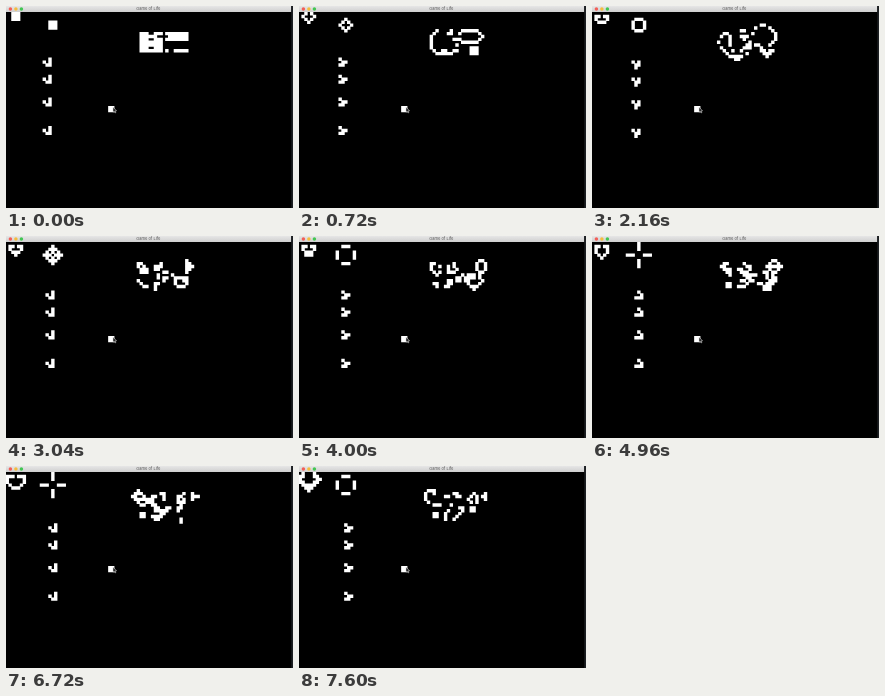
An HTML page with a canvas that plays this animation: 287x202 px, repeating every 8 s.

```html
<!DOCTYPE html>
<html lang="en">
<head>
<meta charset="utf-8">
<title>Game of Life</title>
<style>
  html, body { margin: 0; width: 100%; height: 100%; overflow: hidden; background: #000; }
  canvas { display: block; width: 287px; height: 202px; }
</style>
</head>
<body>
<canvas id="stage"></canvas>
<script>
const W = 287, H = 202, LOOP = 8000;
// Cells are drawn slightly larger than the grid pitch, so they overlap
const PITCH = 2.85, SIZE = 3.42, LEFT = -0.45, TOP = 6;
const COLS = 100, ROWS = 68;
const STEPS = [320, 1200, 2160, 3040, 4000, 4960, 5760, 6720, 7600];

const canvas = document.getElementById('stage');
const ctx = canvas.getContext('2d');
const ratio = window.devicePixelRatio || 1;
canvas.width = Math.round(W * ratio);
canvas.height = Math.round(H * ratio);
ctx.scale(ratio, ratio);

const index = (x, y) => y * COLS + x;

function fill(grid, x, y, w, h, value = 1) {
  for (let r = y; r < y + h; r++)
    for (let c = x; c < x + w; c++) grid[index(c, r)] = value;
}

function glider(grid, x, y) {
  fill(grid, x + 2, y, 1, 3);
  fill(grid, x + 1, y + 2, 1, 1);
  fill(grid, x, y + 1, 1, 1);
}

function seed() {
  const grid = new Uint8Array(COLS * ROWS);
  fill(grid, 2, 0, 3, 3);
  fill(grid, 15, 3, 3, 3);
  fill(grid, 36, 33, 2, 2);
  for (const y of [16, 22, 30, 40]) glider(grid, 13, y);

  // Large hand-drawn shape with slots cut out
  fill(grid, 47, 7, 8, 7);
  for (const y of [7, 9, 12]) fill(grid, 50, y, 2, 1, 0);
  fill(grid, 56, 7, 8, 3);
  fill(grid, 53, 8, 4, 1, 0);
  fill(grid, 56, 13, 1, 1);
  fill(grid, 59, 13, 5, 1);
  return grid;
}

function neighbours(grid, x, y) {
  let n = 0;
  for (let r = Math.max(0, y - 1); r <= Math.min(ROWS - 1, y + 1); r++)
    for (let c = Math.max(0, x - 1); c <= Math.min(COLS - 1, x + 1); c++)
      if (c !== x || r !== y) n += grid[index(c, r)];
  return n;
}

function evolve(grid) {
  return grid.map((alive, i) => {
    const n = neighbours(grid, i % COLS, Math.floor(i / COLS));
    return n === 3 || (alive && n === 2) ? 1 : 0;
  });
}

const generations = [seed()];
for (const _ of STEPS) generations.push(evolve(generations[generations.length - 1]));

function drawCells(grid) {
  ctx.beginPath();
  grid.forEach((alive, i) => {
    if (!alive) return;
    ctx.rect(LEFT + (i % COLS) * PITCH, TOP + Math.floor(i / COLS) * PITCH, SIZE, SIZE);
  });
  ctx.fillStyle = '#fff';
  ctx.fill();
}

function drawWindow() {
  const bar = ctx.createLinearGradient(0, 0, 0, TOP);
  bar.addColorStop(0, '#e6e6e6');
  bar.addColorStop(1, '#cfcfcf');
  ctx.fillStyle = bar;
  ctx.fillRect(0, 0, 285.3, TOP);

  ['#f25f58', '#f5bd3e', '#42c653'].forEach((color, i) => {
    ctx.fillStyle = color;
    ctx.beginPath();
    ctx.arc(4.4 + i * 5.5, 3, 1.75, 0, Math.PI * 2);
    ctx.fill();
  });

  ctx.fillStyle = '#555';
  ctx.font = '4px Inter, Roboto, sans-serif';
  ctx.textAlign = 'center';
  ctx.textBaseline = 'middle';
  ctx.fillText('Game of Life', 142.3, 3.2);

  // Sliver of the desktop beside the window
  ctx.fillStyle = '#1c1f22';
  ctx.fillRect(285.3, 0, W - 285.3, H);
}

function drawCursor() {
  ctx.beginPath();
  ctx.moveTo(107, 101.2);
  ctx.lineTo(107, 106.2);
  ctx.lineTo(108.2, 105.2);
  ctx.lineTo(109.1, 107);
  ctx.lineTo(109.8, 106.6);
  ctx.lineTo(109.1, 104.9);
  ctx.lineTo(110.5, 104.8);
  ctx.closePath();
  ctx.fillStyle = '#111';
  ctx.strokeStyle = '#ddd';
  ctx.lineWidth = 0.6;
  ctx.fill();
  ctx.stroke();
}

const start = performance.now();

function frame() {
  const t = (performance.now() - start) % LOOP;
  const gen = STEPS.filter(step => t >= step).length;
  ctx.fillStyle = '#000';
  ctx.fillRect(0, 0, W, H);
  drawCells(generations[gen]);
  drawWindow();
  drawCursor();
  requestAnimationFrame(frame);
}
frame();
</script>
</body>
</html>
```
